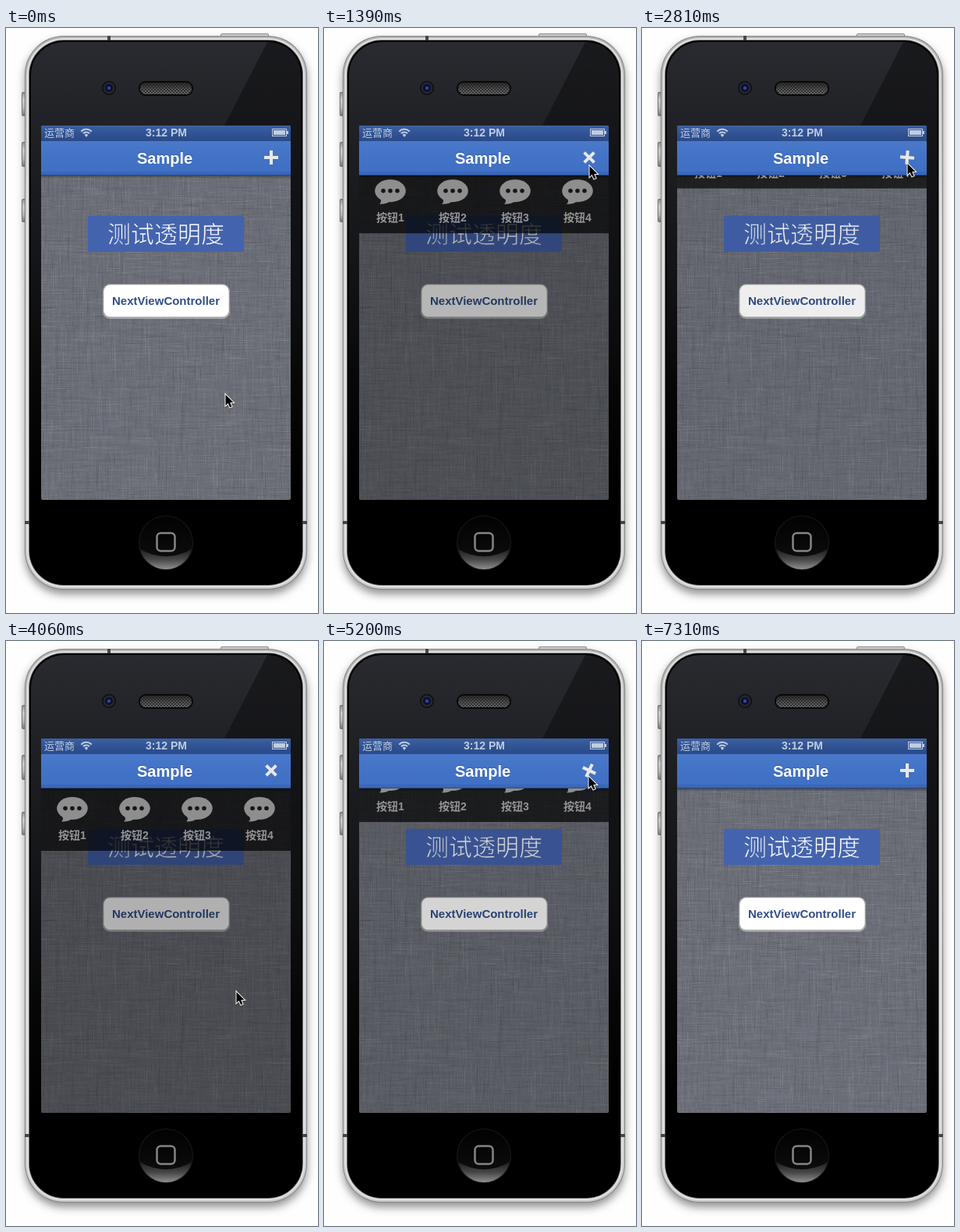
An HTML page with a canvas for the animation above (7.73 s loop, 400 by 750 pixels).

```html
<!DOCTYPE html>
<html lang="zh">
<head>
<meta charset="utf-8">
<title>Sample</title>
<style>
  html, body { margin: 0; width: 100%; height: 100%; overflow: hidden; background: #fefefe; }
  canvas { display: block; }
</style>
</head>
<body>
<canvas id="stage" width="400" height="750"></canvas>
<script>
const W = 400, H = 750, LOOP = 7730;
const SCREEN = { x: 45, y: 125, w: 320, h: 480 };
const NAV_BOTTOM = 189, MENU_HEIGHT = 80, MENU_TIME = 300;
const FONT = '"Liberation Sans", "Noto Sans CJK SC", "Noto Sans CJK", sans-serif';
const CJK = '"Noto Sans CJK SC", "Noto Sans CJK", sans-serif';

const BURSTS = [
  [90, 260, 3], [440, 1040, 8], [1220, 1480, 4], [1660, 1830, 3],
  [2640, 2990, 5], [3440, 4060, 8], [4240, 4940, 9], [5120, 5380, 4],
  [5560, 5650, 2], [6010, 6700, 9], [6790, 7310, 7]
];
// Start time of each menu animation and whether it opens.
const MENU_MOVES = [
  [1150, true], [2610, false], [3370, true],
  [4210, false], [5050, true], [6045, false]
];
// Pointer tip: time, x, y.
const POINTER = [
  [0, 281, 469], [260, 303, 455], [350, 303, 455], [870, 348, 196],
  [1040, 340, 176], [1570, 340, 176], [1830, 340, 173], [3690, 340, 173],
  [4060, 295, 449], [4500, 295, 449], [4680, 354, 183], [4940, 340, 173],
  [5200, 340, 173], [5380, 148, 226], [5470, 148, 226], [5650, 164, 219],
  [6350, 164, 219], [6700, 265, 211], [7225, 327, 711]
];
const POINTER_GONE = 7300;

const clamp = v => Math.max(0, Math.min(1, v));
const lerp = (a, b, u) => a + (b - a) * u;

// Cubic ease-in-out with handles at .42 and .58.
function easeInOut(x) {
  if (x <= 0 || x >= 1) return clamp(x);
  let lo = 0, hi = 1, s = 0.5;
  for (let i = 0; i < 20; i++) {
    s = (lo + hi) / 2;
    const bx = 3 * (1 - s) ** 2 * s * 0.42 + 3 * (1 - s) * s * s * 0.58 + s ** 3;
    if (bx < x) lo = s; else hi = s;
  }
  return s * s * (3 - 2 * s);
}

function heldTime(t) {
  let held = 0;
  for (const [first, last, steps] of BURSTS) {
    if (t < first) break;
    const step = (last - first) / (steps - 1);
    held = first + step * Math.min(steps - 1, Math.floor((t - first + 8) / step));
  }
  return held;
}

function menuOpenness(t) {
  let open = 0;
  for (const [start, opens] of MENU_MOVES) {
    if (t < start) break;
    const u = easeInOut((t - start) / MENU_TIME);
    open = opens ? u : 1 - u;
  }
  return open;
}

function pointerAt(t) {
  const next = POINTER.findIndex(p => p[0] > t);
  if (next < 0) return POINTER[POINTER.length - 1].slice(1);
  const a = POINTER[next - 1], b = POINTER[next];
  const u = clamp((t - a[0]) / (b[0] - a[0]));
  const s = u * u * (3 - 2 * u);
  return [Math.round(lerp(a[1], b[1], s)), Math.round(lerp(a[2], b[2], s))];
}

function layer(draw) {
  const canvas = document.createElement('canvas');
  canvas.width = W;
  canvas.height = H;
  draw(canvas.getContext('2d'));
  return canvas;
}

function gradient(c, x0, y0, x1, y1, ...colors) {
  const g = c.createLinearGradient(x0, y0, x1, y1);
  colors.forEach((color, i) => g.addColorStop(i / (colors.length - 1), color));
  return g;
}

function box(c, x, y, w, h, r, fill) {
  c.fillStyle = fill;
  c.beginPath();
  c.roundRect(x, y, w, h, r);
  c.fill();
}

function disc(c, x, y, r, fill) {
  c.fillStyle = fill;
  c.beginPath();
  c.arc(x, y, r, 0, Math.PI * 2);
  c.fill();
}

function polygon(c, points) {
  c.beginPath();
  points.forEach(([x, y]) => c.lineTo(x, y));
  c.closePath();
}

function label(c, text, x, y, font, color, align = 'center') {
  c.font = font;
  c.fillStyle = color;
  c.textAlign = align;
  c.fillText(text, x, y);
}

function clipScreen(c, top = SCREEN.y) {
  c.beginPath();
  c.roundRect(SCREEN.x, top, SCREEN.w, SCREEN.y + SCREEN.h - top, top > SCREEN.y ? [0, 0, 2, 2] : 2);
  c.clip();
}

function drawCase(c) {
  c.fillStyle = '#fefefe';
  c.fillRect(0, 0, W, H);

  for (const [y, h] of [[82, 31], [146, 32], [219, 30]]) {
    box(c, 20, y, 8, h, 2, '#858585');
    box(c, 21, y + 1, 6, h - 2, 2, gradient(c, 0, y, 0, y + h, '#aaa', '#f3f3f3', '#d8d8d8', '#888'));
  }
  box(c, 275, 7, 62, 8, 2, '#8a8a8a');
  box(c, 276, 8, 60, 6, 1, '#d9d9d9');

  c.save();
  c.shadowColor = 'rgba(0,0,0,.42)';
  c.shadowBlur = 11;
  c.shadowOffsetY = 6;
  box(c, 24, 10, 362, 710, 50, '#848484');
  c.restore();
  box(c, 25, 11, 360, 708, 49, gradient(c, 0, 11, 0, 719, '#b4b4b4', '#d6d6d6', '#dadada', '#cacaca'));
  box(c, 27, 13, 356, 704, 47, '#e2e2e2');
  box(c, 29, 15, 352, 700, 45, '#777');
  c.fillStyle = '#444';
  c.fillRect(130, 10, 4, 6);
  c.fillRect(24, 632, 6, 4);
  c.fillRect(380, 632, 6, 4);

  c.save();
  c.beginPath();
  c.roundRect(30, 16, 350, 698, 44);
  c.clip();
  c.fillStyle = gradient(c, 0, 16, 0, 600, '#2a2b30', '#1d1e22', '#131417', '#070708', '#000');
  c.fillRect(30, 16, 350, 698);
  c.fillStyle = gradient(c, 0, 16, 0, 430, 'rgba(0,0,0,.4)', 'rgba(0,0,0,.3)', 'rgba(0,0,0,0)');
  polygon(c, [[336, 16], [380, 16], [380, 430], [365, 430], [280, 125]]);
  c.fill();
  c.restore();
  c.strokeStyle = '#000';
  c.lineWidth = 2;
  c.beginPath();
  c.roundRect(31, 17, 348, 696, 43);
  c.stroke();
}

function drawFittings(c) {
  disc(c, 132, 77, 9, '#0e0e11');
  disc(c, 132, 77, 7.5, '#26272d');
  disc(c, 132, 77, 5, '#0b1030');
  disc(c, 132, 77, 2.2, '#3445a0');

  box(c, 170, 68, 70, 19, 9, '#08080a');
  c.save();
  c.beginPath();
  c.roundRect(172, 70, 66, 15, 7);
  c.clip();
  c.fillStyle = gradient(c, 0, 70, 0, 85, '#252525', '#505050', '#6c6c6c');
  c.fillRect(172, 70, 66, 15);
  c.fillStyle = '#222';
  for (let y = 70; y < 85; y += 2)
    for (let x = 172 + (y % 4); x < 238; x += 4) c.fillRect(x, y, 2, 1.5);
  c.restore();

  disc(c, 205, 660, 35, '#19191a');
  disc(c, 205, 660, 34, gradient(c, 0, 626, 0, 694, '#020202', '#080808', '#111'));
  c.save();
  c.beginPath();
  c.arc(205, 660, 34, 0, Math.PI * 2);
  c.clip();
  c.fillStyle = gradient(c, 0, 668, 0, 695, '#1d1d1d', '#484848', '#959595');
  c.beginPath();
  c.moveTo(170, 667);
  c.quadraticCurveTo(205, 688, 240, 667);
  c.lineTo(240, 700);
  c.lineTo(170, 700);
  c.fill();
  c.restore();
  c.strokeStyle = '#858585';
  c.lineWidth = 2.5;
  c.beginPath();
  c.roundRect(193.5, 647.5, 23, 23, 5);
  c.stroke();
}

function drawLinen(c) {
  let seed = 41;
  const random = () => (seed = (seed * 16807) % 2147483647) / 2147483647;
  c.fillStyle = '#6b6e77';
  c.fillRect(SCREEN.x, SCREEN.y, SCREEN.w, SCREEN.h);
  for (let i = 0; i < 9000; i++) {
    const x = SCREEN.x - 30 + Math.floor(random() * 350);
    const y = NAV_BOTTOM - 30 + Math.floor(random() * 446);
    const length = 4 + random() * 36;
    const tone = random() < 0.5 ? '255,255,255' : '0,0,0';
    c.fillStyle = `rgba(${tone},${0.01 + random() * 0.045})`;
    if (i % 2) c.fillRect(x, y, length, 1);
    else c.fillRect(x, y, 1, length);
  }
}

function drawContent(c) {
  c.save();
  clipScreen(c);
  drawLinen(c);
  c.fillStyle = gradient(c, 0, NAV_BOTTOM, 0, NAV_BOTTOM + 4, 'rgba(0,0,0,.35)', 'rgba(0,0,0,0)');
  c.fillRect(SCREEN.x, NAV_BOTTOM, SCREEN.w, 4);
  c.restore();

  const blue = '#4463ae';
  c.fillStyle = blue;
  c.fillRect(105, 241, 200, 46);
  label(c, '测试透明度', 205, 275, `300 30px ${CJK}`, '#fff');
  // Trim the glyph edges for a lighter weight.
  c.strokeStyle = blue;
  c.lineWidth = 0.7;
  c.strokeText('测试透明度', 205, 275);

  box(c, 124, 329, 163, 43.5, 9, 'rgba(255,255,255,.6)');
  box(c, 124, 328, 163, 43.5, 9, '#999');
  box(c, 125.3, 329.3, 160.4, 41, 8, '#fff');
  label(c, 'NextViewController', 205, 355, `bold 15px ${FONT}`, '#324f89');
}

function drawBars(c) {
  c.save();
  clipScreen(c);
  c.fillStyle = gradient(c, 0, 125, 0, 145, '#3d60a0', '#305393', '#2a4a88');
  c.fillRect(45, 125, 320, 20);
  c.fillStyle = gradient(c, 0, 145, 0, 184, '#4a79cb', '#4373c6', '#4070c3');
  c.fillRect(45, 145, 320, 39);
  c.fillStyle = '#3a67ba';
  c.fillRect(45, 184, 320, 4);
  c.fillStyle = '#294a8c';
  c.fillRect(45, 188, 320, 1);
  c.restore();

  const pale = '#c0cce2';
  label(c, '运营商', 49, 139, `13px ${CJK}`, pale, 'left');
  label(c, '3:12 PM', 205.5, 139, `bold 14px ${FONT}`, pale);

  c.strokeStyle = pale;
  c.lineWidth = 2;
  for (const r of [5.5, 9.2]) {
    c.beginPath();
    c.arc(103, 139, r, -Math.PI * 0.76, -Math.PI * 0.24);
    c.stroke();
  }
  c.fillStyle = pale;
  c.beginPath();
  c.moveTo(103, 140);
  c.arc(103, 139, 3, -Math.PI * 0.78, -Math.PI * 0.22);
  c.fill();

  c.lineWidth = 1;
  c.strokeRect(341.5, 129.5, 18, 9);
  c.fillRect(343, 131, 15, 6);
  c.fillRect(360, 132, 2, 4);

  label(c, 'Sample', 203.5, 173, `bold 20px ${FONT}`, 'rgba(0,0,0,.2)');
  label(c, 'Sample', 203.5, 174, `bold 20px ${FONT}`, '#fff');
}

function drawMenuItem(c, x, top, name) {
  const y = top + 26;
  c.fillStyle = '#8e8e8e';
  c.beginPath();
  c.ellipse(x, y - 0.5, 19.8, 14.5, 0, 0, Math.PI * 2);
  c.fill();
  c.beginPath();
  c.moveTo(x - 14, y + 8);
  c.quadraticCurveTo(x - 10, y + 13, x - 14, y + 16.5);
  c.quadraticCurveTo(x - 5, y + 17, x + 1, y + 12);
  c.fill();
  for (const dx of [-9, 0, 9]) disc(c, x + dx, y - 0.5, 2.8, '#171718');
  label(c, name, x, top + 65, `bold 14px ${FONT}`, '#949494');
}

function drawMenu(c, open) {
  if (open <= 0) return;
  c.save();
  clipScreen(c, NAV_BOTTOM);
  c.fillStyle = `rgba(0,0,0,${0.31 * open})`;
  c.fillRect(SCREEN.x, NAV_BOTTOM, SCREEN.w, 420);
  const top = NAV_BOTTOM - MENU_HEIGHT * (1 - open);
  c.fillStyle = 'rgba(0,0,0,.69)';
  c.fillRect(SCREEN.x, top, SCREEN.w, MENU_HEIGHT);
  for (let i = 0; i < 4; i++) drawMenuItem(c, 85 + 80 * i, top, '按钮' + (i + 1));
  c.restore();
}

function drawToggle(c, open) {
  c.save();
  c.translate(340, 166);
  c.rotate(easeInOut(open) * Math.PI / 4);
  c.fillStyle = '#e8e8e8';
  c.fillRect(-9, -2, 18, 4);
  c.fillRect(-2, -9, 4, 18);
  c.restore();
}

function drawPointer(c, [x, y]) {
  c.save();
  c.translate(x + 0.5, y + 1);
  polygon(c, [[0, 0], [0, 14], [3.2, 11], [5.6, 16.4], [8, 15.4], [5.7, 10.2], [10, 10]]);
  c.shadowColor = 'rgba(0,0,0,.35)';
  c.shadowBlur = 2;
  c.shadowOffsetY = 1;
  c.lineWidth = 2;
  c.strokeStyle = '#fff';
  c.stroke();
  c.shadowColor = 'transparent';
  c.fillStyle = '#000';
  c.fill();
  c.restore();
}

const ctx = document.getElementById('stage').getContext('2d');
const backdrop = layer(c => {
  drawCase(c);
  drawFittings(c);
  drawContent(c);
});
const bars = layer(drawBars);
const started = performance.now();

function render() {
  const t = heldTime((performance.now() - started) % LOOP);
  const open = menuOpenness(t);
  ctx.drawImage(backdrop, 0, 0);
  drawMenu(ctx, open);
  ctx.drawImage(bars, 0, 0);
  drawToggle(ctx, open);
  if (t < POINTER_GONE) drawPointer(ctx, pointerAt(t));
  requestAnimationFrame(render);
}
render();
</script>
</body>
</html>
```
